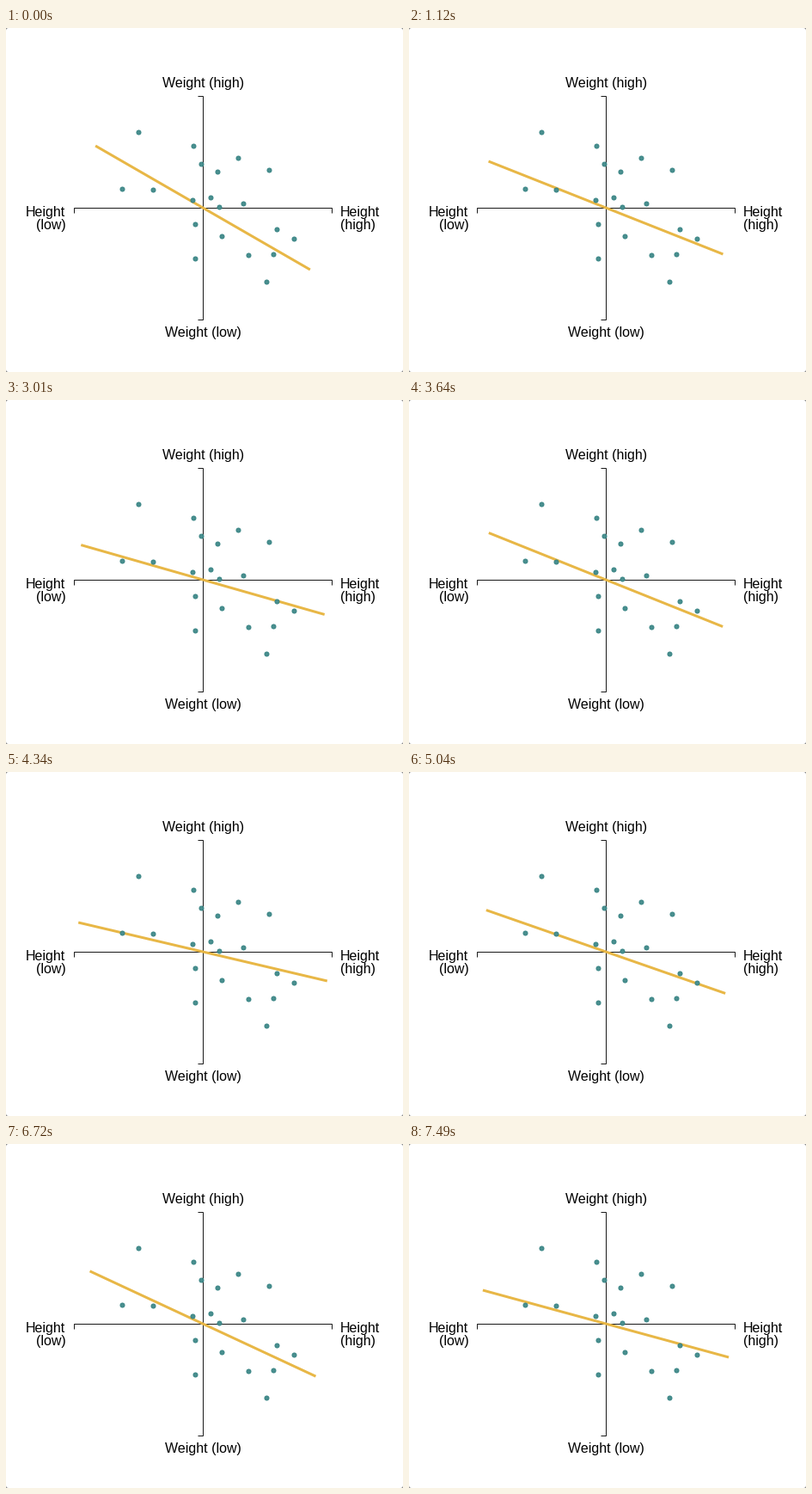
These frames come from a looping animation (462x400 px, 7.63 s). A matplotlib script:

```python
import math

import matplotlib.pyplot as plt
from matplotlib.animation import FuncAnimation
from matplotlib.patches import FancyBboxPatch

WIDTH, HEIGHT, DPI = 462, 400, 100
PX = 72 / DPI
STEP_MS, FRAMES = 70, 109
CX, CY = 229, 209
RX, RY = 150, 130
TICK = 6

# Scatter data as offsets from the origin, in pixels
PEOPLE = [(-94, -22), (-75, -88), (-58, -21), (-12, -9), (-11, -72),
          (-9, 19), (-9, 59), (-2, -51), (9, -12), (17, -42),
          (19, -1), (22, 33), (41, -58), (47, -5), (53, 55),
          (74, 86), (77, -44), (82, 54), (86, 25), (106, 36)]

# The line swings to a new pose on every beat; a pose is its end's drop
POSES = [72, 54, 49, 68, 33, 62, 54, 34, 48, 71, 24, 48, 72, 39]
FIRST_BEAT, BEAT, SWING = 790, 525, 300


def ease(u):
    return 4 * u ** 3 if u < 0.5 else 1 - 4 * (1 - u) ** 3


def rim_point(drop):
    """Offset from the centre to the ellipse that spans both axes."""
    return RX * math.sqrt(1 - (drop / RY) ** 2), drop


def line_end(ms):
    beat, since = divmod(ms - FIRST_BEAT, BEAT)
    if beat < 0:
        return rim_point(POSES[0])
    p = ease(min(1, since / SWING))
    old, new = (rim_point(drop) for drop in POSES[beat:beat + 2])
    return [a + (b - a) * p for a, b in zip(old, new)]


fig = plt.figure(figsize=(WIDTH / DPI, HEIGHT / DPI), dpi=DPI,
                 facecolor="#8a8a8a")
ax = fig.add_axes([0, 0, 1, 1])
ax.set_xlim(0, WIDTH)
ax.set_ylim(HEIGHT, 0)
ax.axis("off")
ax.add_patch(FancyBboxPatch((0, 0), WIDTH, HEIGHT, fc="white", ec="none",
                            boxstyle="round,pad=0,rounding_size=3"))


def axis_path(xs, ys):
    ax.plot(xs, ys, color="#1a1a1a", lw=PX, solid_joinstyle="miter",
            solid_capstyle="butt", zorder=2)


def label(x, baseline, text, align):
    ax.text(x, baseline, text, ha=align, va="baseline", color="black",
            family="Liberation Sans", size=16 * PX)


left, right, top, bottom = CX - RX, CX + RX, CY - RY, CY + RY
axis_path([left, left, right, right], [CY + TICK, CY, CY, CY + TICK])
axis_path([CX - TICK, CX, CX, CX - TICK], [top, top, bottom, bottom])

for word, baseline in (("high", top - 10), ("low", bottom + 20)):
    label(CX + 0.5, baseline, f"Weight ({word})", "center")
for word, x, align in (("low", left - 9.5, "right"),
                       ("high", right + 9.5, "left")):
    label(x, CY + 10, "Height", align)
    label(x, CY + 25, f"({word})", align)

trend, = ax.plot([], [], color="#e8b746", lw=3 * PX, solid_capstyle="butt",
                 zorder=3)
ax.scatter([CX + x for x, _ in PEOPLE], [CY + y for _, y in PEOPLE],
           s=(5 * PX) ** 2, color="#4a8f8f", edgecolors="#348282",
           linewidths=PX, snap=False, zorder=4)


def update(frame):
    dx, dy = line_end(frame * STEP_MS)
    trend.set_data([CX - dx, CX + dx], [CY - dy, CY + dy])
    return trend,


anim = FuncAnimation(fig, update, frames=FRAMES, interval=STEP_MS,
                     repeat=True, repeat_delay=0)
plt.show()
```
